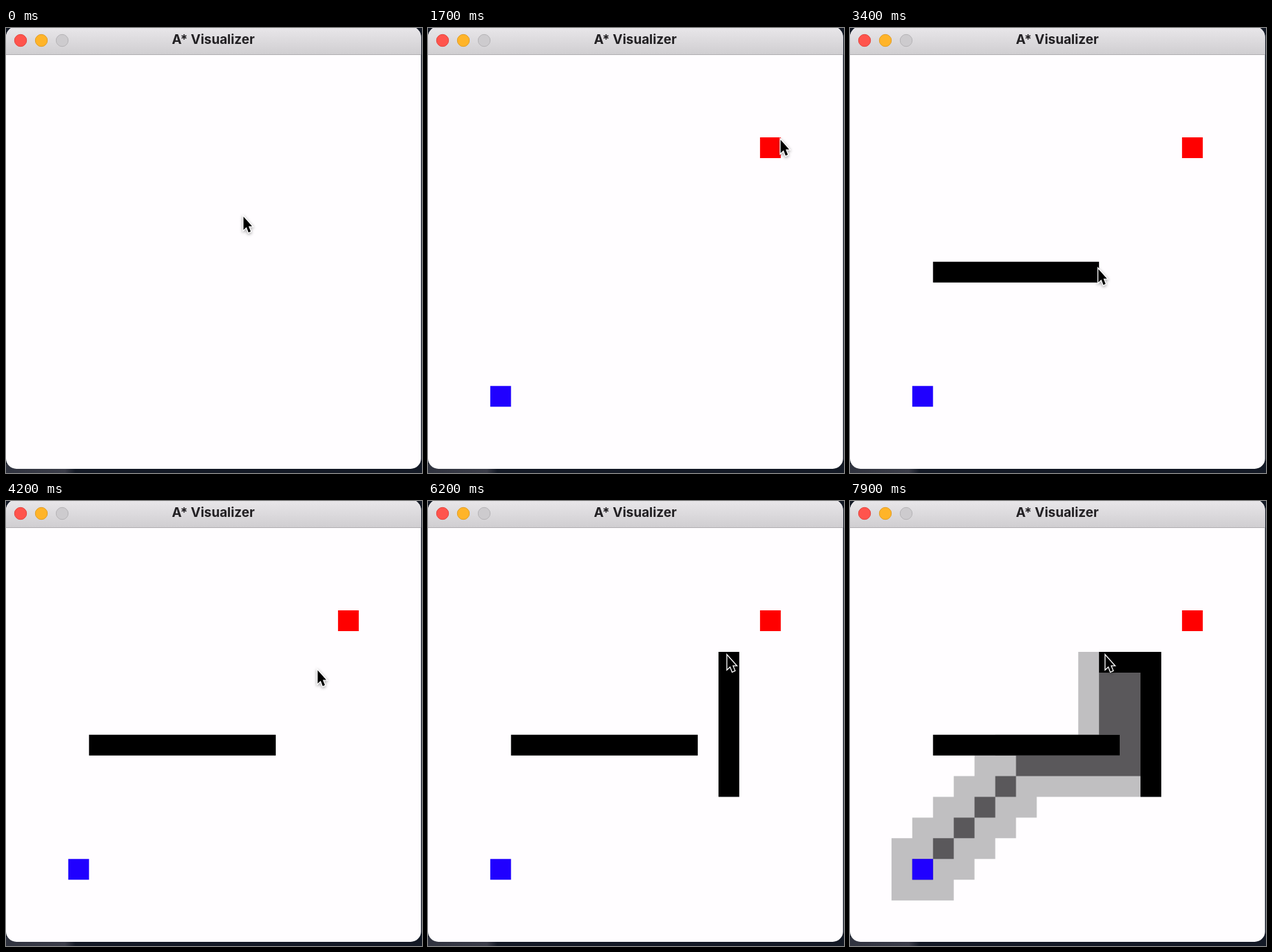
An HTML page with a canvas for the animation above (8 s loop, 600x643 px).

```html
<!DOCTYPE html>
<html lang="en">
<head>
<meta charset="utf-8">
<title>A* Visualizer</title>
<style>
  html, body { margin: 0; width: 100%; height: 100%; overflow: hidden; background: #10151f; }
  canvas { display: block; }
  h1 {
    position: absolute; left: 0; top: 5px; width: 598px; margin: 0;
    font: 700 18.9px/24px Inter, sans-serif; font-feature-settings: "calt" 0;
    text-align: center; color: #222023;
  }
</style>
</head>
<body>
<canvas id="stage" width="600" height="643"></canvas>
<h1>A* Visualizer</h1>
<script>
const ctx = document.getElementById('stage').getContext('2d');
const LOOP = 8000, TICK = 100;
const CELL = 29.93, TOP = 38.4, SIZE = 20;
const START = [3, 16], GOAL = [16, 4];
const COLORS = {
  start: '#2000ff', goal: '#ff0000', wall: '#000000', open: '#c0bfc1', closed: '#5a585b'
};

// Pointer moves: begin and end time, then where the tip comes to rest.
const REST = [342, 272];
const MOVES = [
  [0, 300, 116, 529],
  [900, 1700, 508, 161],
  [1800, 2430, 128, 345],
  [2430, 3600, 377, 348],
  [3700, 4200, 449, 244],
  [4200, 4400, 438, 225],
  [4500, 5200, 448, 426],
  [5500, 5800, 440, 211],
  [5900, 6000, 440, 223],
  [6060, 6700, 368, 223]
];

const SEARCH_BEGIN = 6850, SEARCH_STEP = 60;

const clamp = (v, lo, hi) => Math.min(hi, Math.max(lo, v));
const smooth = k => k * k * (3 - 2 * k);

function pointerAt(t) {
  let [x, y] = REST;
  for (const [begin, end, toX, toY] of MOVES) {
    const k = smooth(clamp((t - begin) / (end - begin), 0, 1));
    x += (toX - x) * k;
    y += (toY - y) * k;
  }
  return [x, y];
}

const isWall = (c, r) =>
  (r === 10 && c >= 4 && c <= 12) ||
  (c === 14 && r >= 6 && r <= 12) ||
  (r === 6 && c >= 12 && c <= 14);

// A* with unit steps in eight directions and Manhattan distance; oldest wins a tie.
function searchOrder(count) {
  const open = [{ cell: START, g: 0 }], seen = new Set([String(START)]), order = [];
  const cost = ({ cell: [c, r], g }) => g + Math.abs(GOAL[0] - c) + Math.abs(GOAL[1] - r);
  while (order.length < count) {
    const best = open.reduce((a, b) => cost(b) < cost(a) ? b : a);
    open.splice(open.indexOf(best), 1);
    order.push(best.cell);
    const [c, r] = best.cell;
    for (let y = r + 1; y >= r - 1; y--) {
      for (let x = c - 1; x <= c + 1; x++) {
        const inside = x >= 0 && y >= 0 && x < SIZE && y < SIZE;
        if (!inside || isWall(x, y) || seen.has(String([x, y]))) continue;
        seen.add(String([x, y]));
        open.push({ cell: [x, y], g: best.g + 1 });
      }
    }
  }
  return order;
}
const EXPANSIONS = searchOrder(Math.ceil((LOOP - SEARCH_BEGIN) / SEARCH_STEP));

function addCells(path, c0, r0, c1, r1) {
  path.rect(c0 * CELL, TOP + r0 * CELL, (c1 - c0 + 1) * CELL, (r1 - r0 + 1) * CELL);
}
function fill(path, color) {
  ctx.fillStyle = color;
  ctx.fill(path);
}
function fillCell([c, r], color) {
  const path = new Path2D();
  addCells(path, c, r, c, r);
  fill(path, color);
}

function drawSearch(t) {
  const progress = (t - SEARCH_BEGIN) / SEARCH_STEP;
  const open = new Path2D(), closed = new Path2D();
  EXPANSIONS.forEach(([c, r], i) => {
    const age = progress - i;
    if (age < 0) return;
    // Neighbours open row by row, from the bottom up.
    const rows = Math.min(3, 1 + Math.floor(age * 8));
    addCells(open, c - 1, r + 2 - rows, c + 1, r + 1);
    addCells(closed, c, r, c, r);
  });
  fill(open, COLORS.open);
  fill(closed, COLORS.closed);
}

// Walls follow the pointer one tick behind.
function drawWalls(t) {
  const trail = end => pointerAt(Math.min(t - TICK, end));
  const col = end => Math.floor(trail(end)[0] / CELL);
  const row = end => Math.floor((trail(end)[1] - TOP) / CELL);
  const walls = new Path2D();
  if (t >= 2600) addCells(walls, 4, 10, clamp(col(3600), 4, 12), 10);
  if (t >= 4600) addCells(walls, 14, 6, 14, clamp(row(5200), 6, 12));
  if (t >= 6200) addCells(walls, clamp(col(6700), 12, 14), 6, 14, 6);
  fill(walls, COLORS.wall);
}

function drawBackdrop() {
  ctx.fillStyle = '#131925';
  ctx.fillRect(0, 0, 600, 643);
  const glow = ctx.createLinearGradient(0, 0, 100, 0);
  glow.addColorStop(0, '#30333f');
  glow.addColorStop(0.85, '#3b3d49');
  glow.addColorStop(1, '#131925');
  ctx.fillStyle = glow;
  ctx.fillRect(0, 630, 100, 13);
}

function drawTitleBar() {
  const bar = ctx.createLinearGradient(0, 0, 0, 38);
  bar.addColorStop(0, '#e8e6e9');
  bar.addColorStop(1, '#d0ced1');
  ctx.fillStyle = bar;
  ctx.fillRect(0, 0, 600, 38);
  ctx.fillStyle = '#b0aeb1';
  ctx.fillRect(0, 38, 600, 1);

  [['#ff544d', '#e2453f'], ['#ffb429', '#e09d25'], ['#cdcbce', '#b5b3b6']].forEach(([face, rim], i) => {
    ctx.beginPath();
    ctx.arc(21 + i * 30, 18, 8.7, 0, Math.PI * 2);
    ctx.fillStyle = face;
    ctx.fill();
    ctx.strokeStyle = rim;
    ctx.lineWidth = 1;
    ctx.stroke();
  });
}

const ARROW = new Path2D('M0.5 0.5V19.8L4.8 15.8L7.8 23.4L11 22L7.9 14.5H13Z');

function drawPointer([x, y]) {
  ctx.save();
  ctx.translate(x, y);
  ctx.lineWidth = 2.6;
  ctx.strokeStyle = '#ffffff';
  ctx.shadowColor = 'rgba(0,0,0,0.4)';
  ctx.shadowBlur = 4;
  ctx.shadowOffsetY = 1.5;
  ctx.stroke(ARROW);
  ctx.shadowColor = 'transparent';
  fill(ARROW, '#000000');
  ctx.restore();
}

function draw(t) {
  drawBackdrop();
  ctx.save();
  ctx.beginPath();
  ctx.roundRect(0, -2, 598.6, 639, 15);
  ctx.clip();
  ctx.fillStyle = '#fffdff';
  ctx.fillRect(0, 0, 600, 643);
  drawTitleBar();
  drawSearch(t);
  drawWalls(t);
  if (t >= 800) fillCell(START, COLORS.start);
  if (t >= 1700) fillCell(GOAL, COLORS.goal);
  ctx.restore();
  drawPointer(pointerAt(t));
}

const origin = performance.now();
function frame() {
  const t = (performance.now() - origin) % LOOP;
  draw(Math.floor(t / TICK) * TICK);
  requestAnimationFrame(frame);
}
frame();
</script>
</body>
</html>
```
